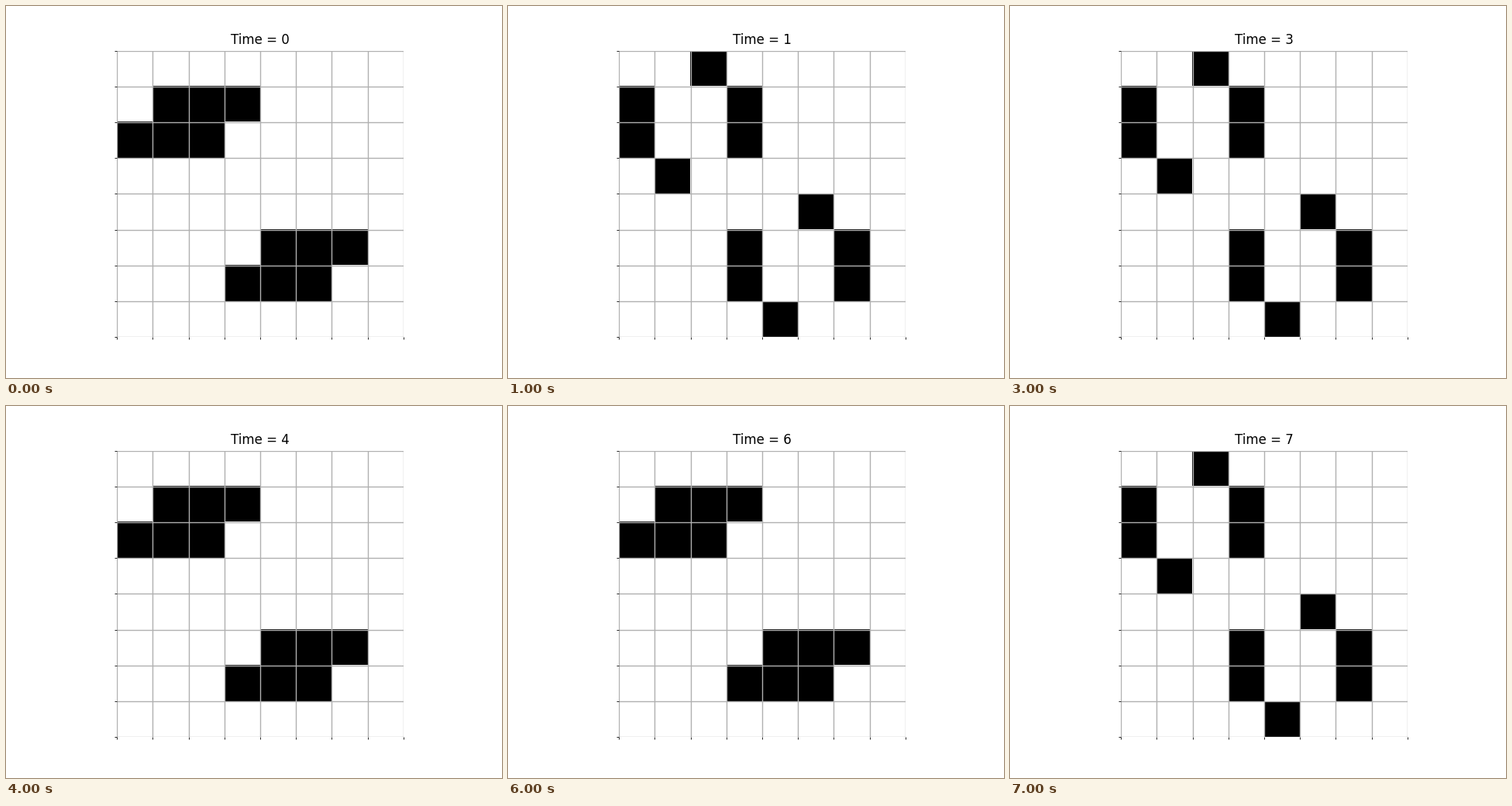
A matplotlib script for the animation above (8000 ms loop, 640 px wide and 480 px high).

```python
import numpy as np
import matplotlib.pyplot as plt
from matplotlib.animation import FuncAnimation

SIZE = 8
STEPS = 8
STEP_MS = 1000


def toad(grid, row, col):
    """Place a toad whose lower row starts at (row + 1, col)."""
    grid[row, col + 1:col + 4] = 1
    grid[row + 1, col:col + 3] = 1


def evolve(grid):
    """One Game of Life step; cells outside the board are dead."""
    padded = np.pad(grid, 1)
    neighbours = sum(
        padded[1 + dy:1 + dy + SIZE, 1 + dx:1 + dx + SIZE]
        for dy in (-1, 0, 1)
        for dx in (-1, 0, 1)
        if (dy, dx) != (0, 0)
    )
    alive = (neighbours == 3) | ((grid == 1) & (neighbours == 2))
    return alive.astype(int)


start = np.zeros((SIZE, SIZE), dtype=int)
toad(start, 1, 0)
toad(start, 5, 3)
history = [start]
for _ in range(STEPS - 1):
    history.append(evolve(history[-1]))

fig, ax = plt.subplots(figsize=(6.4, 4.8), dpi=100)
image = ax.imshow(start, cmap="binary", vmin=0, vmax=1)
title = ax.set_title("Time = 0")

edges = np.arange(-0.5, SIZE)
ax.set_xticks([])
ax.set_yticks([])
ax.set_xticks(edges, minor=True)
ax.set_yticks(edges, minor=True)
ax.grid(which="minor", color="#b0b0b0", linestyle="-", linewidth=1)
ax.spines[:].set_visible(False)


def update(step):
    image.set_data(history[step])
    title.set_text(f"Time = {step}")
    return image, title


anim = FuncAnimation(fig, update, frames=STEPS, interval=STEP_MS,
                     repeat=True, repeat_delay=0)
plt.show()
```
